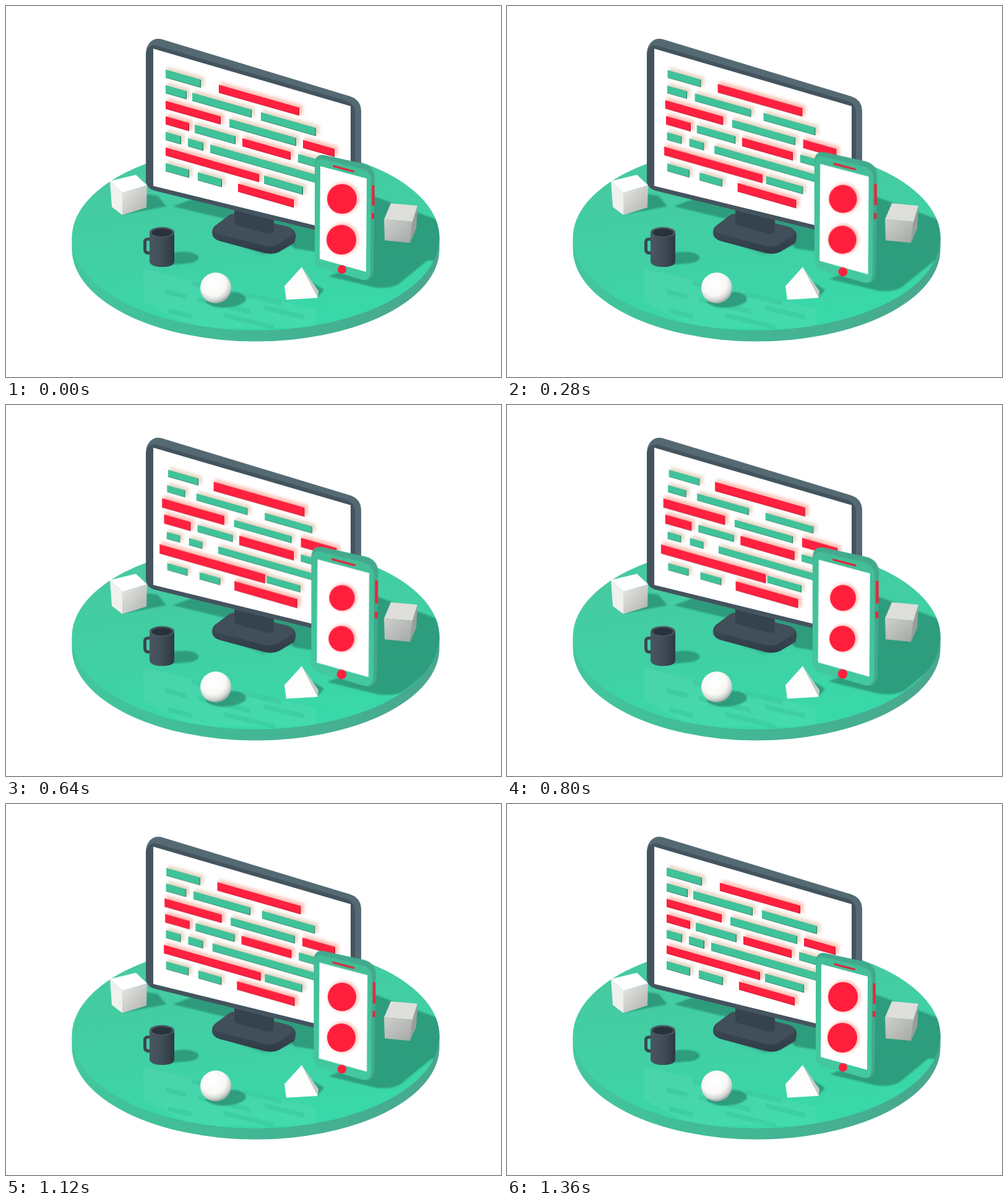
Recreate the animation shown at these times as an HTML page. Size 800 by 600 pixels, loop 1400 ms.

```html
<!DOCTYPE html>
<html lang="en">
<head>
<meta charset="utf-8">
<title>Desk scene</title>
<style>
  html, body { margin: 0; width: 100%; height: 100%; overflow: hidden; background: #fff; }
  svg { display: block; width: 100vw; height: 100vh; }
  .grow, .shrink, .phone {
    animation: 700ms cubic-bezier(.364, 0, .636, 1) -25ms infinite alternate;
  }
  .grow, .shrink { transform-box: fill-box; transform-origin: center; }
  .grow { animation-name: grow; }
  .shrink { animation-name: shrink; }
  .phone { animation-name: swell; transform-origin: 548px 342px; }
  @keyframes grow { to { transform: scale(1.13); } }
  @keyframes shrink { to { transform: scale(.86); } }
  @keyframes swell { to { transform: scale(1.115); } }
</style>
</head>
<body>
<svg viewBox="0 0 800 600">
  <defs>
    <linearGradient id="top" x1=".1" y1="0" x2=".4" y2="1">
      <stop offset="0" stop-color="#48c79f"/>
      <stop offset=".55" stop-color="#41cfa4"/>
      <stop offset="1" stop-color="#39d8a8"/>
    </linearGradient>
    <linearGradient id="rim">
      <stop offset="0" stop-color="#43c79e"/>
      <stop offset=".3" stop-color="#41bd97"/>
      <stop offset="1" stop-color="#48a78e"/>
    </linearGradient>
    <linearGradient id="mug">
      <stop offset="0" stop-color="#4a5661"/>
      <stop offset=".5" stop-color="#404c57"/>
      <stop offset="1" stop-color="#2d3842"/>
    </linearGradient>
    <linearGradient id="base" x2="0" y2="1">
      <stop offset="0" stop-color="#45535e"/>
      <stop offset="1" stop-color="#2f3b46"/>
    </linearGradient>
    <linearGradient id="lit" x1="0" y1="0" x2="1" y2="1">
      <stop offset="0" stop-color="#e9e9e6"/>
      <stop offset="1" stop-color="#adb1ad"/>
    </linearGradient>
    <linearGradient id="dim" x1="0" y1="0" x2="1" y2="1">
      <stop offset="0" stop-color="#cfd0cd"/>
      <stop offset="1" stop-color="#a3a8a4"/>
    </linearGradient>
    <linearGradient id="case" x2="0" y2="1">
      <stop offset="0" stop-color="#43bd97"/>
      <stop offset="1" stop-color="#43c9a0"/>
    </linearGradient>
    <radialGradient id="ball" cx=".42" cy=".35" r=".68">
      <stop offset="0" stop-color="#fff"/>
      <stop offset=".6" stop-color="#f8f8f6"/>
      <stop offset=".82" stop-color="#cfd4d0"/>
      <stop offset="1" stop-color="#84988f"/>
    </radialGradient>
    <filter id="soft" x="-20%" y="-20%" width="140%" height="140%">
      <feGaussianBlur stdDeviation="2.6"/>
    </filter>
    <filter id="edge" x="-20%" y="-20%" width="140%" height="140%">
      <feGaussianBlur stdDeviation="1"/>
    </filter>
    <clipPath id="table"><ellipse cx="403.5" cy="375" rx="297" ry="149.5"/></clipPath>
  </defs>

  <!-- table -->
  <path fill="url(#rim)" d="M106.5 375V393A297 149.5 0 0 0 700.5 393V375Z"/>
  <ellipse cx="403.5" cy="375" rx="297" ry="149.5" fill="url(#top)"/>

  <g clip-path="url(#table)">
    <path fill="#fff" opacity=".05" d="M222 425L500 490V520H300L222 478Z"/>
    <g id="streaks" fill="#1f9c78" opacity=".16"></g>
    <g fill="#2c9274" opacity=".82" filter="url(#edge)">
      <path d="M270 324L302 312L505 350V398L466 392L440 360L345 342Z"/>
      <path d="M590 306L720 354V413L590 408Z"/>
      <path d="M186 338L226 304L245 307L259 324Z"/>
      <path d="M250 420L270 399Q302 394 311 405Q313 413 296 416Z"/>
      <path d="M322 478Q350 461 372 463Q391 467 387 477Q378 487 348 488Q330 487 322 478Z"/>
      <path d="M494 446L514 459L503 472Z"/>
      <path class="phone" d="M522 437L545 428L590 400L690 404L634 450Q620 458 596 455Z"/>
    </g>
    <path fill="#2a8068" opacity=".5" filter="url(#soft)" d="M331 368L416 402L468 385L460 374Z"/>
  </g>

  <!-- monitor stand -->
  <path fill="url(#base)" d="M333 366Q333 358 341 353L361 338Q366 335 374 337L455 357Q470 362 468 375L466 383L441 398Q430 403 416 399L345 380Q333 376 333 366Z"/>
  <path fill="#414f5a" d="M336 362L361 338Q366 335 374 337L455 357Q467 361 463 370L439 386Q430 391 418 388L345 369Q337 367 336 362Z"/>
  <path fill="#36434e" d="M369 328L433 342V364Q430 370 422 368L374 355Q369 353 369 350Z"/>

  <!-- monitor -->
  <path fill="#556973" stroke="#556973" d="M226.500 78Q226.500 66 233 59Q240 51.500 251 54L556 146.500Q573.500 152 573.500 170V350L500 362L240 298Q226.500 294 226.500 281Z"/>
  <path fill="#43545f" d="M226 79Q228 62 243 64L549 153Q564 158 564 172V365L500 362L240 298.500Q226 294.500 226 281Z"/>
  <path fill="#fff" d="M238 69L557 162V369L238 291Z"/>

  <g id="bars"></g>

  <!-- cubes -->
  <path fill="#fff" d="M168 283L210 273L228 290L188 302Z"/>
  <path fill="#f0f0ed" d="M168 283L188 302V338L171 325Z"/>
  <path fill="url(#lit)" d="M188 302L228 290L227 326L188 338Z"/>
  <path fill="#dededb" d="M622 319L665 323L657 349L611 345Z"/>
  <path fill="url(#dim)" d="M611 345L657 349L653 383L612 379Z"/>
  <path fill="#999f9b" d="M657 349L665 323L663 360L653 383Z"/>

  <!-- mug -->
  <path fill="none" stroke="#3b4752" stroke-width="5" d="M235 377H229Q224 377 224.500 383V394Q225 401 234 399"/>
  <path fill="url(#mug)" d="M232 366V414Q235 422 252 422Q270 422 272 414V366Z"/>
  <ellipse cx="252" cy="366" rx="20" ry="8.500" fill="#4b5863"/>
  <ellipse cx="252" cy="366.500" rx="16.500" ry="6.500" fill="#28323b"/>

  <!-- ball and pyramid -->
  <circle cx="339" cy="456" r="25" fill="url(#ball)"/>
  <path fill="#fdfdfc" d="M478 422L450 453L453 475L504 472Z"/>
  <path fill="#c3cbc6" d="M478 422L505 461L504 472Z"/>

  <!-- phone -->
  <g class="phone">
    <path fill="#43a98c" d="M499 257Q499 239 514 241L578 255Q596 260 596 278L594 428Q593 446 576 443L515 425Q500 421 499 408Z"/>
    <path fill="url(#case)" d="M499 262Q499 245 513 248L574 263Q590 267 590 283L589 430Q588 446 574 442L515 425Q500 421 499 408Z"/>
    <path fill="#fff" d="M508 259L583 279L582 430L507 409Z"/>
    <path stroke="#e8203a" stroke-width="3" stroke-linecap="round" d="M529.500 259L561.500 267.500"/>
    <path stroke="#f2203b" stroke-width="4" d="M593.500 290V323M593 335V344.500"/>
    <circle cx="543" cy="426" r="7" fill="#ff1f3d"/>
  </g>
  <g id="badges"></g>
</svg>

<script>
(() => {
  const NS = 'http://www.w3.org/2000/svg';
  const SLOPE = 0.285, HEIGHT = 13;
  const byId = id => document.getElementById(id);
  const add = (parent, tag, attrs) => {
    const el = document.createElementNS(NS, tag);
    for (const k in attrs) el.setAttribute(k, attrs[k]);
    return parent.appendChild(el);
  };
  const slab = (x, y, w, h = HEIGHT, slope = SLOPE) =>
    `M${x} ${y}l${w} ${w * slope}v${h}l${-w} ${-w * slope}z`;
  const barTop = (row, x) => 103 + 25.2 * row + SLOPE * (x - 258);

  // bars on the screen: row, left, right
  const green = {
    cls: 'shrink', face: '#40c39a', side: '#2d765f', glow: '#d9c3a8',
    list: [
      [0, 258, 315], [1, 258, 292], [1, 301, 397], [1, 412, 501],
      [2, 361, 469], [3, 305, 371], [3, 472, 534],
      [4, 258, 283], [4, 294, 319], [4, 330, 516],
      [5, 417, 480], [6, 258, 296], [6, 310, 349]
    ]
  };
  const red = {
    cls: 'grow', face: '#ff213f', side: '#bd1a32', glow: '#ffa08f',
    list: [
      [0, 344, 474], [2, 258, 347], [2, 480, 531],
      [3, 258, 296], [3, 382, 460], [5, 258, 409], [6, 375, 465]
    ]
  };

  const bars = byId('bars');
  function drawGlow({ list, cls, glow }) {
    const g = add(bars, 'g', {
      filter: 'url(#soft)', transform: 'translate(4 -3)', opacity: 0.65,
      fill: glow, stroke: glow, 'stroke-width': 3
    });
    for (const [row, l, r] of list)
      add(g, 'path', { d: slab(l, barTop(row, l), r - l), class: cls });
  }
  function drawBars({ list, cls, face, side }) {
    for (const [row, l, r] of list) {
      const g = add(bars, 'g', { class: cls }), y = barTop(row, l);
      add(g, 'path', { d: slab(l, y, r - l), fill: side });
      add(g, 'path', { d: slab(l, y, r - l - 1.2, HEIGHT - 0.8), fill: face });
    }
  }
  [green, red].forEach(drawGlow);
  [green, red].forEach(drawBars);

  const badges = byId('badges');
  for (const [x, y] of [[543, 312], [542, 378]]) {
    add(badges, 'circle', {
      cx: x + 2, cy: y - 1, r: 26, fill: '#ff9a90', opacity: 0.6,
      filter: 'url(#soft)', class: 'shrink'
    });
    add(badges, 'circle', { cx: x, cy: y, r: 24, fill: '#ff1f3d', class: 'shrink' });
  }

  // faint reflections on the table top
  const streaks = byId('streaks');
  for (const [x, y, w] of [
    [258, 458, 34], [300, 444, 88], [262, 489, 38], [310, 470, 84],
    [352, 496, 82], [385, 462, 60], [418, 484, 64]
  ]) add(streaks, 'path', { d: slab(x, y, w, 8, 0.24) });
})();
</script>
</body>
</html>
```
